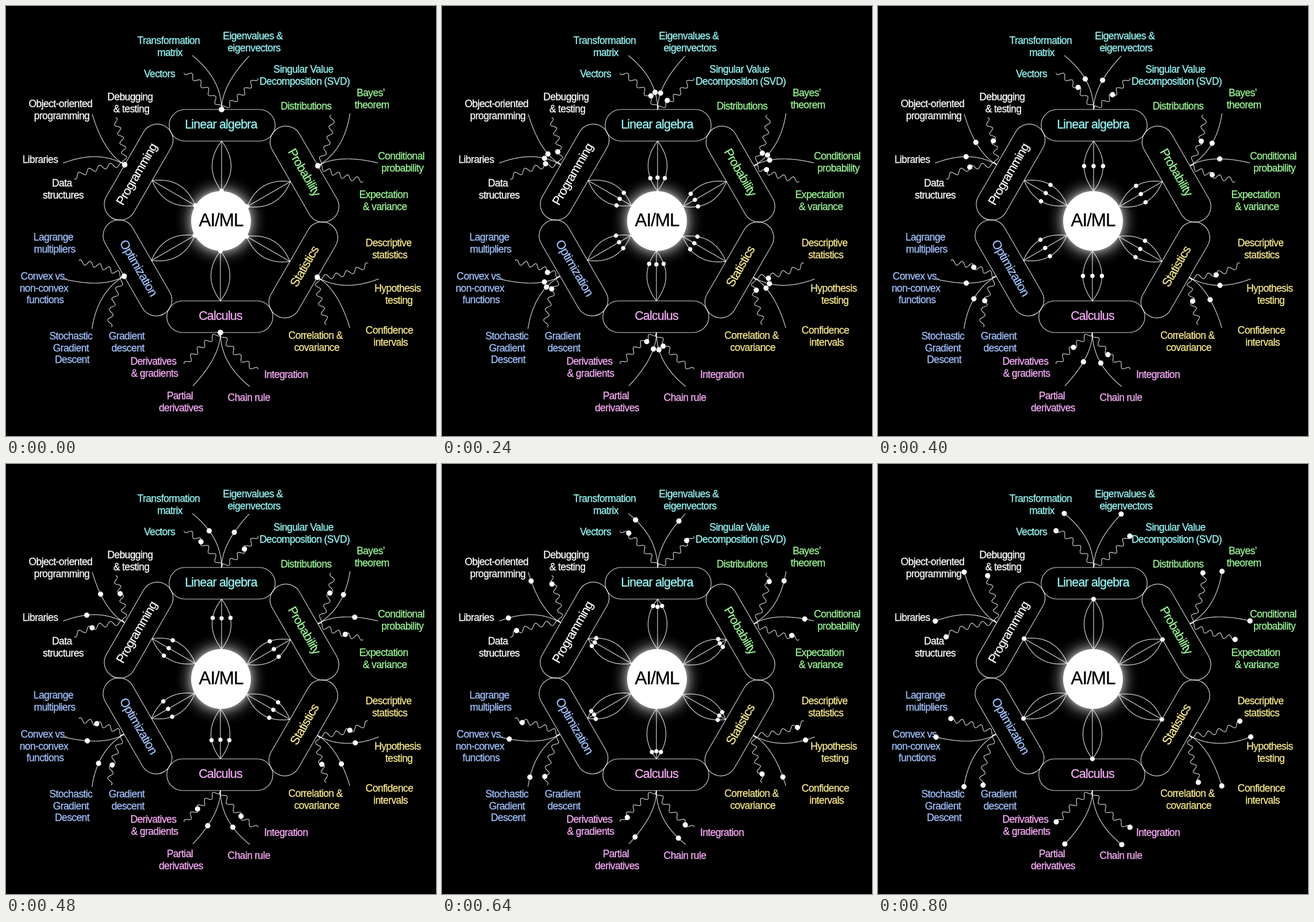
Animation, 748 px wide and 748 px high, one loop 0.96 s. Source, as an HTML page with a canvas:

```html
<!DOCTYPE html>
<html lang="en">
<head>
<meta charset="utf-8">
<title>AI/ML mind map</title>
<style>
  html, body { margin: 0; width: 100%; height: 100%; overflow: hidden; background: #000; }
  canvas { display: block; width: 748px; height: 748px; }
</style>
</head>
<body>
<canvas id="stage" width="748" height="748"></canvas>
<script>
const canvas = document.getElementById('stage');
const ctx = canvas.getContext('2d');
const CENTER = 374, HUB_RADIUS = 52, STEP_MS = 80, LOOP_MS = 960, LAST_STEP = 10;
const WAVES = 4.9;
const FONT = '"Liberation Sans", Arial, sans-serif';

// Clockwise from the top; each label is [x, y, lines].
const groups = [
  { title: 'Linear algebra', color: '#99f8f8', shift: -2, labels: [
    [285, 60, 'Transformation|matrix'], [431.5, 52, 'Eigenvalues &|eigenvectors'],
    [267, 118, 'Vectors'], [519.5, 110, 'Singular Value|Decomposition (SVD)']] },
  { title: 'Probability', color: '#9df798', shift: -3, labels: [
    [636.5, 151, 'Bayes’|theorem'], [522, 174, 'Distributions'],
    [689.5, 261, 'Conditional|probability'], [659, 328, 'Expectation|& variance']] },
  { title: 'Statistics', color: '#f8e990', shift: 6, labels: [
    [667.5, 412, 'Descriptive|statistics'], [683.5, 491, 'Hypothesis|testing'],
    [669, 564, 'Confidence|intervals'], [540.5, 573, 'Correlation &|covariance']] },
  { title: 'Calculus', color: '#f8acf8', shift: 1, labels: [
    [487, 641, 'Integration'], [422.5, 681, 'Chain rule'],
    [304.5, 678, 'Partial|derivatives'], [258.5, 618, 'Derivatives|& gradients']] },
  { title: 'Optimization', color: '#a1c1fc', shift: 1, labels: [
    [212, 574, 'Gradient|descent'], [115, 574, 'Stochastic|Gradient|Descent'],
    [68, 470, 'Convex vs.|non-convex|functions'], [84.5, 402, 'Lagrange|multipliers']] },
  { title: 'Programming', color: '#ffffff', shift: -5, labels: [
    [99.5, 308, 'Data|structures'], [59.5, 267, 'Libraries'],
    [97, 170, 'Object-oriented|programming'], [218, 158, 'Debugging|& testing']] }
];

// Quadratic curve with an optional sine wave across it, sampled by arc length.
function makePath(start, control, end, wave = 0) {
  const points = [], lengths = [0], count = 240;
  for (let i = 0; i <= count; i++) {
    const t = i / count, r = 1 - t;
    const at = k => r * r * start[k] + 2 * r * t * control[k] + t * t * end[k];
    const slope = k => r * (control[k] - start[k]) + t * (end[k] - control[k]);
    const dx = slope(0), dy = slope(1), norm = Math.hypot(dx, dy) || 1;
    const offset = wave * Math.sin(2 * Math.PI * WAVES * t);
    points.push([at(0) - dy / norm * offset, at(1) + dx / norm * offset]);
    if (i) {
      const [px, py] = points[i - 1], [x, y] = points[i];
      lengths.push(lengths[i - 1] + Math.hypot(x - px, y - py));
    }
  }
  return { points, lengths };
}

function pointOn({ points, lengths }, share) {
  const goal = share * lengths[lengths.length - 1];
  return points[lengths.findIndex(l => l >= goal - 1e-6)];
}

// One spoke pointing up, relative to the hub; the others are its rotations.
const petals = [-33, 0, 33].map(bulge => makePath([1, -52], [1 + bulge, -95.5], [1, -139]));
const branch = (cx, cy, x, y, wave) =>
  makePath([1, -194], [1 + cx, -194 + cy], [1 + x, -194 + y], wave);
const branches = [
  branch(0, -53, -51, -94), branch(0, -42, 48, -93),
  branch(-25, -42, -64, -66, 4.2), branch(36, -22, 61, -56, -4.2)
];

// Constant speed with a short ramp at both ends.
function ease(u) {
  const ramp = 0.13, speed = 1 / (1 - ramp);
  if (u < ramp) return speed * u * u / (2 * ramp);
  if (u > 1 - ramp) return 1 - ease(1 - u);
  return speed * (u - ramp / 2);
}

function strokePath(path) {
  ctx.beginPath();
  path.points.forEach(([x, y]) => ctx.lineTo(x, y));
  ctx.stroke();
}

function dot(x, y, radius) {
  ctx.beginPath();
  ctx.arc(x, y, radius, 0, 2 * Math.PI);
  ctx.fill();
}

// A hairline outline gives the letters slightly more weight.
function write(text, x, baseline, size, spacing, color) {
  ctx.font = `${size}px ${FONT}`;
  ctx.letterSpacing = `${spacing}px`;
  ctx.textAlign = 'center';
  ctx.lineWidth = 0.3;
  ctx.fillStyle = ctx.strokeStyle = color;
  ctx.fillText(text, x, baseline);
  ctx.strokeText(text, x, baseline);
}

function onSpoke(index, draw) {
  ctx.save();
  ctx.translate(CENTER, CENTER);
  ctx.rotate(index * Math.PI / 3);
  draw();
  ctx.restore();
}

function drawHub() {
  const glow = ctx.createRadialGradient(CENTER, CENTER, HUB_RADIUS - 2, CENTER, CENTER, 82);
  [[0, 0.56], [0.25, 0.28], [0.5, 0.11], [0.75, 0.03], [1, 0]].forEach(([stop, alpha]) =>
    glow.addColorStop(stop, `rgba(255,255,255,${alpha})`));
  ctx.fillStyle = glow;
  dot(CENTER, CENTER, 82);
  ctx.fillStyle = '#fff';
  dot(CENTER, CENTER, HUB_RADIUS);
}

function drawSpoke(group, index) {
  ctx.strokeStyle = 'rgba(255,255,255,0.82)';
  ctx.lineWidth = 1.2;
  [...petals, ...branches].forEach(strokePath);
  ctx.beginPath();
  ctx.roundRect(-90.2, -194, 184.4, 55, 27.5);
  ctx.stroke();

  ctx.translate(2, -166.5);
  if (index > 1 && index < 5) ctx.rotate(Math.PI);
  write(group.title, group.shift, 5.8, 21.5, -0.85, group.color);
}

function drawLabel([x, y, text], color) {
  const lines = text.split('|');
  lines.forEach((line, i) => {
    const gap = i < lines.length - 1 ? ' ' : '';
    write(line + gap, x, y + 6 + i * 20.6, 17.5, -0.6, color);
  });
}

function drawDots(share) {
  ctx.fillStyle = '#fff';
  petals.forEach(path => dot(...pointOn(path, share), 3.7));
  branches.forEach(path => dot(...pointOn(path, share), 4.6));
}

function render(time) {
  const step = Math.min(LAST_STEP, Math.floor(time % LOOP_MS / STEP_MS));
  const share = ease(step / LAST_STEP);
  ctx.fillStyle = '#000';
  ctx.fillRect(0, 0, 748, 748);
  drawHub();
  groups.forEach((group, i) => {
    onSpoke(i, () => drawSpoke(group, i));
    group.labels.forEach(label => drawLabel(label, group.color));
  });
  groups.forEach((_, i) => onSpoke(i, () => drawDots(share)));
  write('AI/ML', CENTER, 383, 31.5, -1.1, '#000');
}

const startTime = performance.now();
function tick() {
  render(performance.now() - startTime);
  requestAnimationFrame(tick);
}
tick();
</script>
</body>
</html>
```
